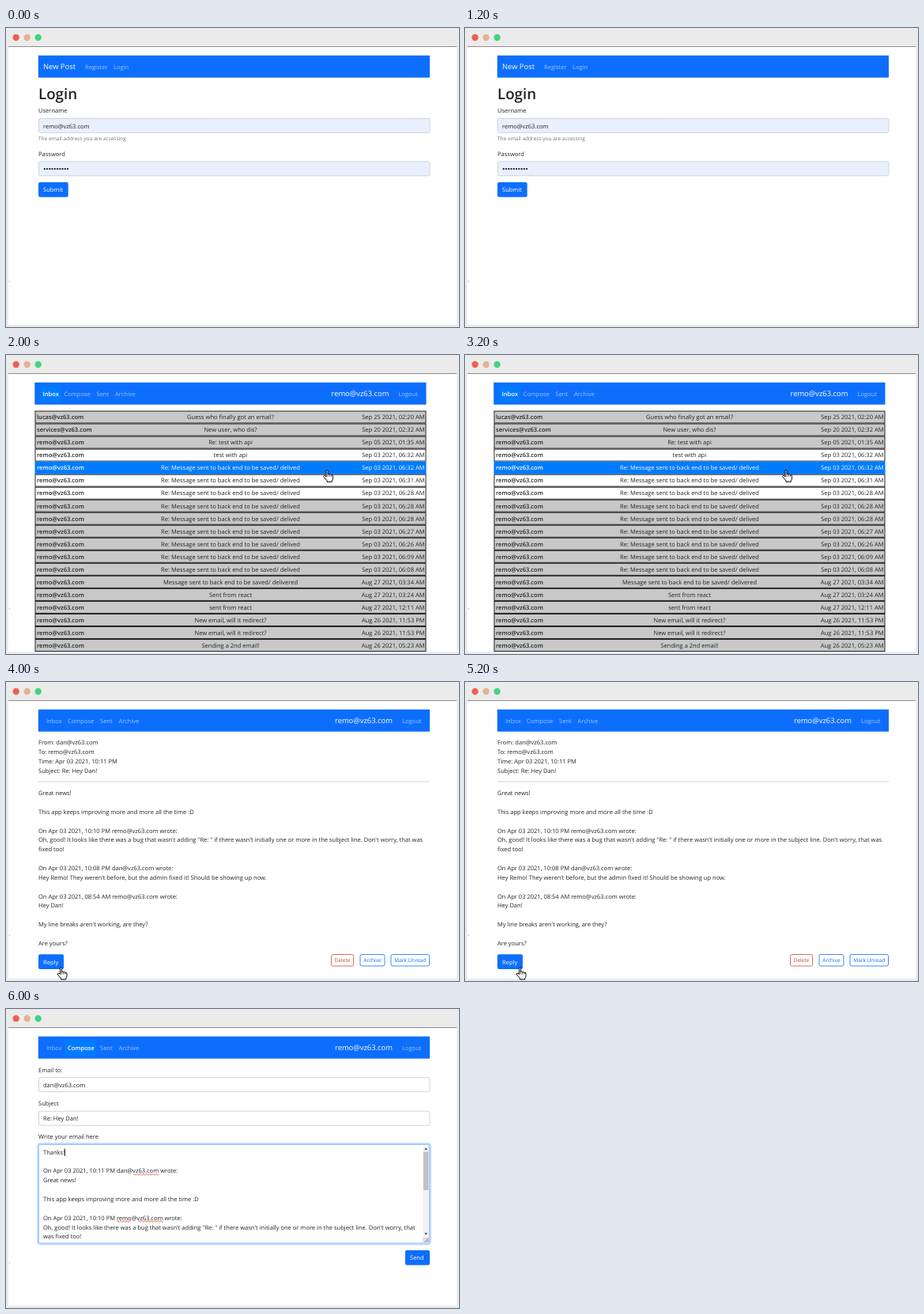
These frames come from a looping animation (573 px wide and 378 px high, 8000 ms). An HTML page:

```html
<!DOCTYPE html>
<html lang="en">
<head>
<meta charset="utf-8">
<title>Mail client tour</title>
<style>
html, body { margin: 0; width: 100%; height: 100%; overflow: hidden; background: #ebebeb; }
svg { display: block; width: 573px; height: 378px; }
text { font: 7.54px "Open Sans", "Noto Sans", sans-serif; fill: #212529; text-rendering: geometricPrecision; white-space: pre; }
.big { font-size: 9.4px; font-weight: 500; fill: #fff; }
.h1 { font-size: 18.75px; font-weight: 600; }
.small { font-size: 6.56px; }
.white { fill: #fff; font-weight: 500; }
.bold { font-weight: 600; }
.dim { fill: #9ec5fe; }
.muted { fill: #6c757d; }
</style>
</head>
<body>
<svg id="stage" viewBox="0 0 573 378"></svg>
<script>
const BLUE = '#0d6efd', BRIGHT = '#007bff', RED = '#c9492f';
const HOST = '@vz63.com', ME = 'remo' + HOST, PAL = 'dan' + HOST;

const text = (x, y, s, cls = '', anchor = 'start') =>
  `<text x="${x}" y="${y}" class="${cls}" text-anchor="${anchor}">${s}</text>`;

const rect = (x, y, w, h, fill, stroke = 'none', r = 0, width = 1) =>
  `<rect x="${x}" y="${y}" width="${w}" height="${h}" fill="${fill}" stroke="${stroke}" rx="${r}" stroke-width="${width}"/>`;

const path = (d, stroke, width = 1, fill = 'none', more = '') =>
  `<path d="${d}" stroke="${stroke}" stroke-width="${width}" fill="${fill}" ${more}/>`;

const lines = (x, y, list) =>
  list.map((s, i) => s && text(x, y + i * 11.85, s)).join('');

const field = (y, s, fill = '#fff', stroke = '#ced4da') =>
  rect(41.5, y, 494.5, 18, fill, stroke, 2) + text(47, y + 12.2, s);

const button = (x, y, w, s) =>
  rect(x, y, w, 18.7, BLUE, 'none', 2) + text(x + 6, y + 12.2, s, 'white');

const outline = (x, w, s, color) =>
  rect(x + .5, 344.5, w - 1, 14.5, '#fff', color, 2, .8) +
  `<text x="${x + w / 2}" y="354.2" class="small" text-anchor="middle" style="fill:${color}">${s}</text>`;

const bar = () => rect(40.8, 34.7, 495.2, 28, BLUE);

const nav = active => bar() +
  [['Inbox', 51, 27.5], ['Compose', 78, 40], ['Sent', 119], ['Archive', 142.5]].map(([s, x, w]) =>
    s === active
      ? rect(x - 4, 38.5, w, 21.5, BRIGHT) + text(x, 51.5, s, 'white bold')
      : text(x, 51.5, s, 'dim')).join('') +
  text(416, 52.3, ME, 'big') + text(501, 51.5, 'Logout', 'dim');

const hand = (x, y) => `<g transform="translate(${x} ${y})">` +
  path('M4 9V1.8Q4 .5 5 .5T6 1.8V6Q7 5 8.2 6.2Q9.4 5.4 10.4 6.8Q12.5 6.2 12.5 8.5V11Q12.5 13 11.3 14V15.5H5V14L1 9.5Q.3 8.2 1.4 7.7Q2.6 7.4 4 9Z',
    '#000', 1, '#fff', 'stroke-linejoin="round"') +
  path('M6 6V9M8.2 6.2V9M10.4 6.8V9', '#000', .7) + '</g>';

const wavy = (x, y, w) => path(`M${x} ${y}q1 -1.6 2 0` + 't2 0'.repeat(w / 2 - 1), '#e0301e', .7);

const login = () => bar() +
  text(47, 52.3, 'New Post', 'big') +
  text(100, 51.5, 'Register', 'dim') + text(136, 51.5, 'Login', 'dim') +
  text(41, 90.3, 'Login', 'h1') +
  text(41, 107.2, 'Username') + field(114.3, ME, '#e8f0fe') +
  text(41, 142, 'The email address you are accessing', 'small muted') +
  text(41, 161.7, 'Password') + field(168.8, '', '#e8f0fe') +
  Array.from({ length: 10 }, (_, i) => `<circle cx="${48.8 + i * 3.25}" cy="178.2" r="1.15" fill="#212529"/>`).join('') +
  button(41, 195, 37.7, 'Submit');

const saved = 'Message sent to back end to be saved/ ';
const mails = [
  ['Guess who finally got an email?', 'Sep 25 2021, 02:20 AM', 'lucas'],
  ['New user, who dis?', 'Sep 20 2021, 02:32 AM', 'services'],
  ['Re: test with api', 'Sep 05 2021, 01:35 AM'],
  ['test with api', 'Sep 03 2021, 06:32 AM'],
  ...['06:32', '06:31', '06:28', '06:28', '06:28', '06:27', '06:26', '06:09', '06:08']
    .map(t => [`Re: ${saved}delived`, `Sep 03 2021, ${t} AM`]),
  [saved + 'delivered', 'Aug 27 2021, 03:34 AM'],
  ['Sent from react', 'Aug 27 2021, 03:24 AM'],
  ['sent from react', 'Aug 27 2021, 12:11 AM'],
  ['New email, will it redirect?', 'Aug 26 2021, 11:53 PM'],
  ['New email, will it redirect?', 'Aug 26 2021, 11:53 PM'],
  ['Sending a 2nd email!', 'Aug 26 2021, 05:23 AM']
];

const row = ([subject, date, user = 'remo'], i) => {
  const y = 71 + i * 16.03, hover = i === 4;
  const fill = hover ? BRIGHT : i > 2 && i < 7 ? '#fff' : '#c8c8c8';
  const cls = hover ? 'white' : '';
  return rect(37, y, 494, 15, fill, hover ? BRIGHT : '#222') +
    text(39, y + 10.3, user + HOST, cls + ' bold') +
    text(284, y + 10.3, subject, cls, 'middle') +
    text(529.5, y + 10.3, date, cls, 'end');
};

const inbox = () => `<g transform="translate(-4.5 0)">${nav('Inbox')}</g>` +
  mails.map(row).join('') + hand(401, 144.8);

const app = 'This app keeps improving more and more all the time :D';
const bug = `Oh, good! It looks like there was a bug that wasn't adding "Re: " if there wasn't initially one or more in the subject line. Don't worry, that`;

const message = () => nav() +
  lines(41, 79.4, ['From: ' + PAL, 'To: ' + ME, 'Time: Apr 03 2021, 10:11 PM', 'Subject: Re: Hey Dan!']) +
  rect(41, 125.5, 495, 1, '#cfcfcf') +
  lines(41, 143.2, [
    'Great news!', '', app, '',
    `On Apr 03 2021, 10:10 PM ${ME} wrote:`, bug + ' was', 'fixed too!', '',
    `On Apr 03 2021, 10:08 PM ${PAL} wrote:`,
    "Hey Remo! They weren't before, but the admin fixed it! Should be showing up now.", '',
    `On Apr 03 2021, 08:54 AM ${ME} wrote:`, 'Hey Dan!', '',
    "My line breaks aren't working, are they?", '', 'Are yours?'
  ]) +
  button(41, 344.3, 32, 'Reply') +
  outline(411, 29, 'Delete', RED) +
  outline(447.5, 32, 'Archive', BLUE) +
  outline(486.5, 49.5, 'Mark Unread', BLUE) +
  hand(64.5, 360.5);

const compose = () => nav('Compose') +
  text(41, 79.5, 'Email to:') + field(86.7, PAL) +
  text(41, 122, 'Subject') + field(129.2, 'Re: Hey Dan!') +
  text(41, 164.4, 'Write your email here') +
  rect(40.5, 170.5, 496, 126.5, '#fff', '#c2dbfe', 3, 3) +
  rect(41.5, 171.5, 494, 124.5, '#fff', '#86b7fe', 2, .8) +
  lines(47, 183.7, [
    'Thanks!', '', `On Apr 03 2021, 10:11 PM ${PAL} wrote:`, 'Great news!', '', app, '',
    `On Apr 03 2021, 10:10 PM ${ME} wrote:`, bug, 'was fixed too!'
  ]) +
  rect(74, 176.5, .8, 9.5, '#000') +
  wavy(161, 209.3, 32) + wavy(140, 268.5, 18) + wavy(167, 268.5, 32) +
  rect(527.3, 173, 7.7, 116, '#f1f1f1') + rect(528, 180.5, 6.3, 48.5, '#c1c1c1') +
  path('M529.2 178l2 -2.6 2 2.6zM529.2 283l2 2.6 2 -2.6z', 'none', 0, '#505050') +
  rect(527.3, 289, 7.7, 6.5, '#dcdcdc') +
  path('M529.5 294.8l5 -5M532 294.8l2.5 -2.5', '#777', .8) +
  button(505, 305, 31, 'Send');

const frame = rect(0, 0, 573, 378, '#ebebeb') + rect(3, 23, 567, 352, '#fff') +
  rect(3, 23, 567, 1, '#8c8c8c') +
  ['#ec6052', '#e2b291', '#43d380'].map((c, i) => `<circle cx="${12.7 + i * 14}" cy="12" r="4.2" fill="${c}"/>`).join('') +
  rect(4, 319.5, .8, 2, '#aaa');

const stage = document.getElementById('stage');
stage.innerHTML = frame + [login, inbox, message, compose].map(scene => `<g class="scene">${scene()}</g>`).join('');
const scenes = stage.querySelectorAll('.scene');

function draw() {
  const now = Math.floor(performance.now() % 8000 / 2000);
  scenes.forEach((g, i) => g.style.display = i === now ? '' : 'none');
  requestAnimationFrame(draw);
}
draw();
</script>
</body>
</html>
```
